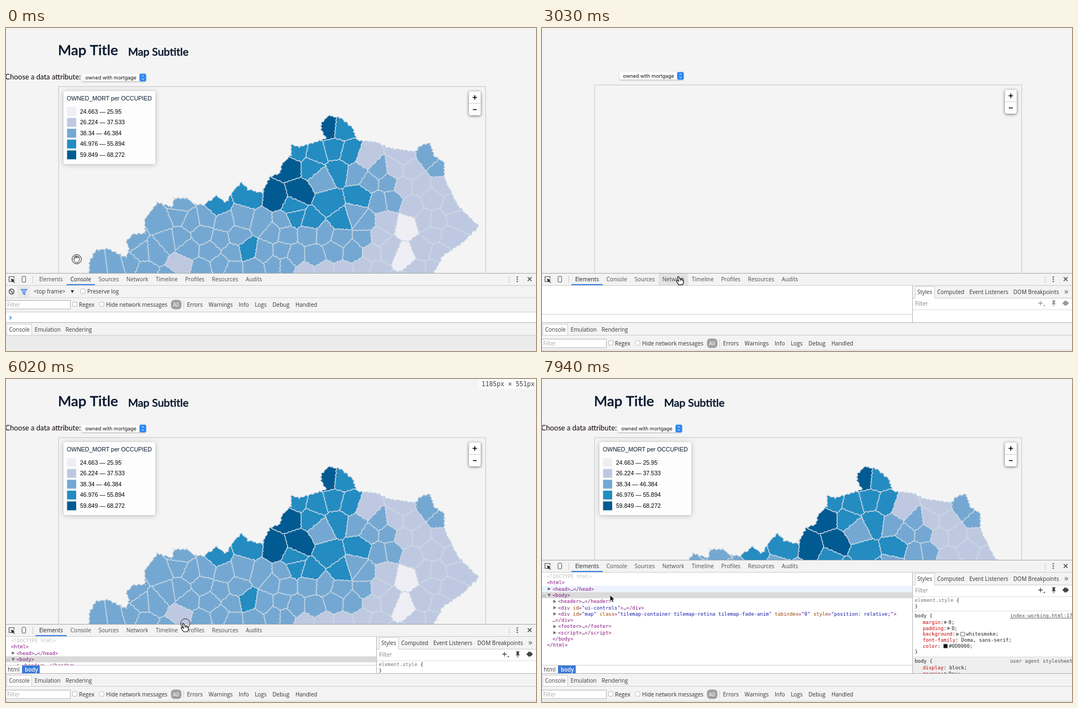
Write an HTML page with a canvas that moves like this. It is 959 px wide and 584 px high and loops after 8000 ms.

```html
<!DOCTYPE html>
<html lang="en">
<head>
<meta charset="utf-8">
<style>
html, body { margin: 0; width: 100%; height: 100%; overflow: hidden; background: #f4f4f4; }
canvas { display: block; }
</style>
</head>
<body>
<canvas id="stage" width="959" height="584"></canvas>
<script>
const ctx = document.getElementById('stage').getContext('2d');
const LOOP = 8000, W = 959, DRAWER = 533;
const UI = '10px "Open Sans", sans-serif';
const MONO = '8.93px "DejaVu Sans Mono", monospace';
const SHADES = ['#f0eef5', '#bec9e1', '#74a8d2', '#248cc1', '#015b92'];

// ---------- drawing helpers ----------
function rect(x, y, w, h, color) {
  ctx.fillStyle = color;
  ctx.fillRect(x, y, w, h);
}
function box(x, y, w, h, fill, stroke, r = 0) {
  ctx.beginPath();
  ctx.roundRect(x, y, w, h, r);
  ctx.fillStyle = fill;
  ctx.fill();
  if (stroke) { ctx.strokeStyle = stroke; ctx.lineWidth = 1; ctx.stroke(); }
}
function shadowBox(x, y, w, h, r, blur, alpha) {
  ctx.save();
  ctx.shadowColor = `rgba(0,0,0,${alpha})`;
  ctx.shadowBlur = blur;
  ctx.shadowOffsetY = 1;
  box(x, y, w, h, '#fdfdfd', null, r);
  ctx.restore();
}
function text(s, x, baseline, font = UI, color = '#333') {
  ctx.font = font;
  ctx.fillStyle = color;
  ctx.fillText(s, x, baseline);
  return x + ctx.measureText(s).width;
}
function heading(s, x, baseline, size) {
  text(s, x, baseline, `500 ${size}px Lato, sans-serif`, '#06152b');
  ctx.strokeStyle = '#06152b';
  ctx.lineWidth = 0.5;
  ctx.strokeText(s, x, baseline);
}
// Lays labels out in a row: [label, left, width] each.
function flow(labels, x, gap) {
  ctx.font = UI;
  return labels.map(label => {
    const item = [label, x, ctx.measureText(label).width];
    x += item[2] + gap;
    return item;
  });
}
const labelRow = (labels, x, baseline, gap, color) =>
  flow(labels, x, gap).forEach(([label, left]) => text(label, left, baseline, UI, color));

function shape(d, x, y, fill, stroke, width = 1) {
  const path = new Path2D(d);
  ctx.save();
  ctx.translate(x, y);
  if (fill) { ctx.fillStyle = fill; ctx.fill(path); }
  if (stroke) { ctx.strokeStyle = stroke; ctx.lineWidth = width; ctx.stroke(path); }
  ctx.restore();
}
function clipped(x, y, w, h, draw) {
  ctx.save();
  ctx.beginPath();
  ctx.rect(x, y, w, h);
  ctx.clip();
  draw();
  ctx.restore();
}
const triangle = (x, y, open, color = '#6e6e6e') =>
  shape(open ? 'M-3,-2.5H3L0,3Z' : 'M-2.5,-3V3L3,0Z', x, y, color);

// ---------- county map ----------
const points = s => s.split(' ').map(p => p.split(',').map(Number));

const coast = points('150,470 151,422 163,402 185,399 217,415 223,400 217,386 229,373 252,371 251,346 274,315 300,324 305,308 330,308 338,318 358,320 381,303 398,316 413,292 427,279 438,292 463,298 477,270 495,262 500,245 516,230 516,211 532,215 580,199 570,185 571,170 585,158 606,163 628,181 635,203 672,207 692,217 740,224 752,211 767,208 774,230 793,243 793,272 817,321 855,359 828,386 790,412 760,470');
// Counties that stand out from their surroundings, by shade.
const landmarks = [
  '725,358 719,412',
  '318,428 652,237',
  '572,272 765,232 787,255',
  '437,401 440,303 382,322 641,304 606,347 526,222 607,182',
  '585,180 514,251 490,308 529,297',
].flatMap((s, shade) => points(s).map(p => ({ p, shade })));

const noise = n => { const s = Math.sin(n * 127.1) * 43758.5; return s - Math.floor(s); };
const distance = (a, b) => Math.hypot(a[0] - b[0], a[1] - b[1]);

// Light in the east and far south, dark in a leaning ellipse around the centre.
function regionShade([x, y]) {
  if (x > (y < 315 ? 700 : 662) || (y > 430 && x > 508)) return 1;
  const u = (x - 565 + (y - 270) * 0.3) / 60, v = (y - 270) / 98;
  return u * u + v * v < 1 ? 3 : 2;
}
// Position-based wobble keeps shared borders identical on both sides.
const wobble = ([x, y], size) =>
  [x + size * Math.sin(y * 0.9 + x * 0.2), y + size * Math.sin(x * 0.8 - y * 0.1)];

function border(poly, size = 1) {
  const path = new Path2D();
  poly.forEach((a, i) => {
    const b = poly[(i + 1) % poly.length];
    const n = Math.max(1, Math.round(distance(a, b) / 3));
    for (let k = 0; k < n; k++) {
      path.lineTo(...wobble([a[0] + (b[0] - a[0]) * k / n, a[1] + (b[1] - a[1]) * k / n], size));
    }
  });
  path.closePath();
  return path;
}
// Keeps the part of poly that lies nearer to p than to q.
function nearer(poly, p, q) {
  const side = v => (v[0] - (p[0] + q[0]) / 2) * (q[0] - p[0]) + (v[1] - (p[1] + q[1]) / 2) * (q[1] - p[1]);
  return poly.flatMap((a, i) => {
    const b = poly[(i + 1) % poly.length], sa = side(a), sb = side(b);
    const kept = sa <= 0 ? [a] : [];
    if (sa * sb < 0) {
      const f = sa / (sa - sb);
      kept.push([a[0] + (b[0] - a[0]) * f, a[1] + (b[1] - a[1]) * f]);
    }
    return kept;
  });
}
const outline = border(coast, 1.5);

function buildCounties() {
  const sites = [...landmarks];
  for (let i = 0; i < 264; i++) {
    const row = Math.floor(i / 24), col = i % 24;
    const p = [
      145 + col * 32 + (row % 2) * 16 + (noise(i + 1) - 0.5) * 18,
      165 + row * 30 + (noise(i + 500) - 0.5) * 16,
    ];
    const free = landmarks.every(l => distance(l.p, p) > 27);
    if (free && ctx.isPointInPath(outline, ...p)) sites.push({ p, shade: regionShade(p) });
  }
  const area = [[130, 140], [880, 140], [880, 470], [130, 470]];
  return sites.map(({ p, shade }) => ({
    shade,
    path: border(sites.reduce((poly, s) => s.p === p ? poly : nearer(poly, p, s.p), area)),
  }));
}
const counties = buildCounties();

function drawMap() {
  ctx.save();
  ctx.clip(outline);
  ctx.strokeStyle = '#cfd9e3';
  ctx.lineWidth = 1.3;
  for (const { shade, path } of counties) {
    ctx.fillStyle = SHADES[shade];
    ctx.fill(path);
    ctx.stroke(path);
  }
  ctx.restore();
  ctx.strokeStyle = '#c3d2e0';
  ctx.lineWidth = 1.2;
  ctx.stroke(outline);
}

// ---------- web page ----------
function drawLegend() {
  const font = '10.55px "Liberation Sans", Arial, sans-serif';
  shadowBox(104, 114, 166, 132, 4, 10, 0.25);
  text('OWNED_MORT per OCCUPIED', 110, 131, font, '#0b1a30');
  ['24.663 — 25.95', '26.224 — 37.533', '38.34 — 46.384', '46.976 — 55.894', '59.849 — 68.272'].forEach((range, i) => {
    rect(110.5, 143 + i * 19.6, 16.5, 16, SHADES[i]);
    text(range, 134, 154.5 + i * 19.6, font, '#000');
  });
}
function drawPage(loading, bottom) {
  rect(0, 0, W, bottom, '#f4f4f4');
  const dy = loading ? -3 : 0, sx = loading ? 140 : 137;
  if (!loading) {
    heading('Map Title', 94, 49, 25.9);
    heading('Map Subtitle', 221, 50, 19.4);
    text('Choose a data attribute:', -1.5, 92.5, '13px Lato, sans-serif', '#0d0000');
  }
  shadowBox(sx, 82.5 + dy, 116.5, 14, 3, 2, 0.3);
  box(sx + 104.5, 82.5 + dy, 12, 14, '#2a85f4', null, 3);
  shape('M-2,-1.5L0,-4 2,-1.5M-2,1.5L0,4 2,1.5', sx + 110.5, 89.5 + dy, null, '#fff');
  text('owned with mortgage', sx + 6.5, 93 + dy, '9px Inter, sans-serif', '#111');

  ctx.strokeStyle = '#d4d5d6';
  ctx.lineWidth = 1.6;
  ctx.strokeRect(95.2, 105.8 + dy, 772.6, 500);
  if (!loading) {
    drawMap();
    drawLegend();
  }
  shadowBox(837.5, 114.5 + dy, 21.5, 43.5, 4, 5, 0.6);
  rect(837.5, 136 + dy, 21.5, 1, '#ccc');
  shape('M-4,0H4M0,-4V4M-3.5,22H3.5', 848.3, 125.5 + dy, null, '#000', 1.6);
}

// ---------- developer panel ----------
const tabs = flow(['Elements', 'Console', 'Sources', 'Network', 'Timeline', 'Profiles', 'Resources', 'Audits'], 60, 13.5);

function drawTabs(top, selected, hoverX) {
  rect(0, top, W, 22, '#f3f3f3');
  rect(0, top, W, 1, '#a6a6a6');
  rect(0, top + 22, W, 1, '#cccccc');
  shape('M4,4.5H-4.5V-4.5H4.5V-1', 10, top + 11, null, '#555', 1.2);
  shape('M-1,-1L6,1.5 3.5,3 6,6 5,7 2,4 .5,6Z', 10, top + 11, '#333');
  box(29, top + 6, 6.5, 10.5, '#f3f3f3', '#555', 1.5);
  rect(48, top + 5, 1, 13, '#ccc');
  for (const [name, x, width] of tabs) {
    const left = x - 6.7, full = width + 13.5, active = name === selected;
    if (hoverX >= left && hoverX < left + full) rect(left, top + 1, full, 21, '#e3e3e3');
    if (active) rect(left, top + 20, full, 2, '#3f82e4');
    text(name, x, top + 15, UI, active ? '#222' : '#4c4c4c');
  }
  rect(910, top + 5, 1, 13, '#ccc');
  for (const dy of [-4, 0, 4]) rect(924, top + 10 + dy, 2.2, 2.2, '#555');
  shape('M-3.5,-3.5L3.5,3.5M3.5,-3.5L-3.5,3.5', 947.5, top + 11, null, '#444', 1.5);
}

function markup(s, x, baseline) {
  for (const token of s.split(/("[^"]*"|[\w-]+(?==)|…)/)) {
    const color = /^<!/.test(token) ? '#c0c0c0' : token[0] === '"' ? '#1a1aa6'
      : /^[\w-]+$/.test(token) ? '#994500' : token === '…' ? '#333' : '#881280';
    x = text(token, x, baseline, MONO, color);
  }
}
// Two spaces indent a row by one level; ▸ and ▾ mark expanders.
function domRows(tagged) {
  const id = n => tagged ? ` data-quillmar-id="${n}"` : '';
  return [
    '<!DOCTYPE html>',
    `<html${id(470)}>`,
    `  ▸<head${id(471)}>…</head>`,
    `  ▾<body${id(481)}>`,
    `    ▸<header${id(482)}>…</header>`,
    '    ▸<div id="ui-controls">…</div>',
    '    ▸<div id="map" class="tilemap-container tilemap-retina tilemap-fade-anim" tabindex="0" style="position: relative;">',
    '  …</div>',
    '    ▸<footer>…</footer>',
    '    ▸<script>…<\/script>',
    '  </body>',
    '</html>',
  ];
}
function drawTree(top, tagged, hoverHead) {
  domRows(tagged).forEach((row, i) => {
    const [, indent, expander, s] = row.match(/^( *)([▸▾]?)(.*)$/);
    const x = 9 + indent.length * 5, mid = top + 30 + i * 11.3;
    if (expander === '▾') {
      rect(0, mid - 5.5, 670, 11, '#dadada');
      text('…', 1, mid + 2, MONO, '#777');
    }
    if (hoverHead && s.startsWith('<head>')) rect(0, mid - 5.5, 670, 11, '#edf3fe');
    if (expander) triangle(x - 6, mid, expander === '▾');
    markup(s, x, mid + 3);
  });
}
function drawRule(top, rows) {
  text('body {', 674.5, top + 3, MONO, '#222');
  rows.forEach(([name, value, fold, swatch], i) => {
    const mid = top + 12 + i * 10.7;
    let x = text(name, 689, mid + 3, MONO, '#c80000');
    x = text(':', x, mid + 3, MONO, '#222');
    if (fold) triangle(x + 4, mid, false);
    x += fold ? 9 : 5;
    if (swatch) {
      box(x + .5, mid - 3.5, 7, 7, swatch, '#777');
      x += 10;
    }
    text(value, x, mid + 3, MONO, '#222');
  });
}
function drawStyles(top, loading) {
  rect(671, top + 23, 288, 22, '#f3f3f3');
  rect(671, top + 45, 288, 1, '#ccc');
  box(675.5, top + 24.5, 35, 21, '#fff', '#ccc');
  rect(676, top + 45, 34, 1, '#fff');
  labelRow(['Styles', 'Computed', 'Event Listeners', 'DOM Breakpoints'], 679, top + 38, 9);
  text('»', 945, top + 38, '15px "Open Sans", sans-serif', '#555');
  text('Filter', 675, top + 59, UI, '#888');
  const ink = loading ? '#999' : '#444';
  shape('M-4,0H4M0,-4V4', 902, top + 54.5, null, ink, 1.3);
  shape('M6,6H9V3Z', 901, top + 54, ink);
  shape('M-3,-5H3V-4L2,-3V0L4,2H.6V6H-.6V2H-4L-2,0V-3L-3,-4Z', 926, top + 54.5, ink);
  shape('M-6,0L-1,-5 4,0 -1,5ZM1,-5L6,0 1,5Z', 947.5, top + 54.5, ink);
  rect(671, top + 66, 288, 1, '#ddd');
  if (loading) return;
  const end = text('element.style', 674.5, top + 76, MONO, '#777');
  text(' {', end, top + 76, MONO, '#222');
  text('}', 674.5, top + 87, MONO, '#222');
  rect(671, top + 92, 288, 1, '#ddd');
  drawRule(top + 101, [
    ['margin', '0;', true], ['padding', '0;', true], ['background', 'whitesmoke;', true, '#f5f5f5'],
    ['font-family', 'Doma, sans-serif;'], ['color', '#0D0000;', false, '#0d0000'],
  ]);
  text('index-working.html:17', 847, top + 104, MONO, '#555');
  rect(847, top + 105, 112, .8, '#555');
  text('}', 674.5, top + 169, MONO, '#222');
  rect(671, top + 175, 288, 220, '#efefef');
  rect(671, top + 175, 288, 1, '#ddd');
  drawRule(top + 183, [['display', 'block;'], ['margin', '8px;', true]]);
  text('user agent stylesheet', 847, top + 186, MONO, '#555');
}
function drawElements(top, { loading, tagged, hoverHead }) {
  rect(0, top + 23, W, DRAWER - top - 23, '#fff');
  if (!loading) clipped(0, top + 23, 670, 517 - top - 23, () => drawTree(top, tagged, hoverHead));
  rect(0, 517, 670, 1, '#ccc');
  if (!loading) {
    rect(29, 518, 32, 15, '#3879d9');
    text('html', 3, 529);
    text('body', 34, 529, '600 10px "Open Sans", sans-serif', '#fff');
  }
  clipped(671, top + 23, 288, DRAWER - top - 23, () => drawStyles(top, loading));
  rect(670, top + 23, 1, DRAWER - top - 23, '#b5b5b5');
}

const checkbox = (x, mid) => box(x + .5, mid - 4.5, 8, 8, '#fff', '#bbb', 1.5);
function drawFilterRow(mid) {
  box(-.5, mid - 7.5, 117, 15.5, '#fff', '#b0b0b0');
  text('Filter', 2, mid + 4, UI, '#aaa');
  checkbox(120, mid);
  text('Regex', 132, mid + 4);
  checkbox(168.5, mid);
  text('Hide network messages', 181, mid + 4);
  box(298.5, mid - 8.5, 19, 17, '#a0a0a0', null, 6);
  text('All', 302, mid + 3.5, UI, '#fff');
  rect(321, mid - 7, 1, 14, '#ccc');
  labelRow(['Errors', 'Warnings', 'Info', 'Logs', 'Debug', 'Handled'], 327.5, mid + 3.5, 10.7);
}
function drawConsole() {
  rect(0, 466, W, 47, '#f3f3f3');
  rect(0, 487, W, 1, '#d5d5d5');
  rect(0, 513, W, 20, '#fff');
  rect(0, 513, W, 1, '#ccc');
  shape('M4.5,0A4.5,4.5 0 1 1 -4.5,0A4.5,4.5 0 1 1 4.5,0M-3,-3L3,3', 10, 476.5, null, '#444', 1.4);
  rect(21, 467, 22, 20, '#e8e8e8');
  shape('M-5,-4.5H5L1.5,0V5L-1.5,3.5V0Z', 32.5, 477, '#9cc0f8', '#2f73e0', 1.2);
  text('<top frame>', 50, 480);
  triangle(120, 476.5, true, '#333');
  checkbox(134.5, 476.5);
  text('Preserve log', 147, 480);
  drawFilterRow(500);
  shape('M-1.5,-3L1.5,0 -1.5,3', 8, 524, null, '#2f73e0', 1.4);
}
function drawDrawer(withFilter) {
  rect(0, DRAWER, W, 51, withFilter ? '#f3f3f3' : '#ebebeb');
  rect(0, DRAWER, W, 22, '#f3f3f3');
  rect(0, DRAWER - 1, W, 1, '#b0b0b0');
  rect(0, 555, W, 1, '#ccc');
  box(1.5, 535.5, 45, 20, '#fff', '#ccc');
  labelRow(['Console', 'Emulation', 'Rendering'], 5.5, 549, 8.7, '#3a3a3a');
  if (withFilter) {
    drawFilterRow(570);
    rect(0, 582, W, 1, '#ccc');
    rect(0, 583, W, 1, '#fff');
  }
}

// ---------- pointer ----------
const ARROW = 'M0,0V11.5L2.7,9 4.6,13 6.6,12.2 4.8,8.2H8.3Z';
const HAND = 'M-1.8,1Q-1.2,-.8 .4,.3L3,5 5,4.3 7,5 8.6,6.4 9.2,11 7.2,15H.5L-2.5,11 -4,7.6 -2.4,6.6 .2,8.6Z';
const PALM = 'M-6,0L-4.5,-1 -3.5,0 -5,-4 -3.5,-5 -2,-2 -2.2,-6H-.5L0,-2 1,-6 2.6,-5.5 2.4,-2 4,-4.5 5.2,-3.5 4.5,2 3,6H-2.5Z';

function ring(x, y) {
  ctx.beginPath();
  ctx.arc(x, y, 8.5, 0, 7);
  ctx.strokeStyle = '#222';
  ctx.lineWidth = 1;
  ctx.stroke();
}
function drawPointer(x, y, kind, pressed) {
  if (kind === 'palm') ring(x, y);
  if (pressed) ring(x + 3.5, y);
  if (kind === 'palm') {
    shape(PALM, x, y, '#fff', '#111', .8);
  } else if (kind === 'hand') {
    shape(HAND, x, y, '#fff', '#111', 1.2);
    shape('M3,5V8M5,4.5V8M7,5V8.5', x, y, null, '#111', .8);
  } else {
    shape(ARROW, x, y, '#000', '#fff', .8);
  }
}

// ---------- timeline ----------
const DRAG = 5880, RELEASE = 7340;
// Stops of the pointer: time, x, y.
const stops = [
  [0, 128, 418], [600, 86, 453], [930, 90, 455], [1680, 258, 453], [3330, 246, 449], [3780, 273, 438],
  [4530, 277, 449], [5280, 317, 446], [DRAG, 321, 443], [RELEASE, 322, 326], [7930, 119, 392],
];
// The picture is refreshed about every 150 ms.
function refreshed(t) {
  const offset = t < 6300 ? 30 : 80;
  return Math.max(0, Math.floor((t - offset) / 150) * 150 + offset);
}
// Height of the divider while dragged up; a larger power arrives sooner.
function dragged(t, power) {
  const f = Math.min(1, Math.max(0, (t - DRAG) / 1010));
  return Math.round(327 + 116 * (1 - f) ** power);
}
function pointerAt(t) {
  const next = stops.findIndex(s => s[0] > t);
  if (next < 0) return stops[stops.length - 1].slice(1);
  const [t0, x0, y0] = stops[next - 1], [t1, x1, y1] = stops[next];
  const f = (t - t0) / (t1 - t0), eased = f * f * (3 - 2 * f);
  const y = t >= DRAG && t < RELEASE ? dragged(t, 3.3) - 1 : y0 + (y1 - y0) * eased;
  return [x0 + (x1 - x0) * eased, y];
}

function draw(t) {
  const step = refreshed(t);
  const loading = t >= 2740 && t < 3180;
  const onConsole = t < 780;
  const pressed = t >= DRAG && t < 7040;
  // The page, the panel and the pointer follow the drag at different speeds.
  const top = dragged(step, 1.6), bottom = dragged(step, 2.3);
  const [x, y] = pointerAt(step);
  const overTabs = !pressed && y >= top && y < top + 22;

  rect(0, 0, W, 584, '#fff');
  clipped(0, 0, W, bottom, () => drawPage(loading, bottom));
  if (t >= DRAG && t < 7490) {
    rect(856, 0, 103, 18, 'rgba(255,255,255,.85)');
    text(`1185px × ${Math.round(top * 1.2357 + 4)}px`, 860.5, 12.5, '11.4px "DejaVu Sans Mono", monospace', '#444');
  }
  if (onConsole) drawConsole();
  else drawElements(top, { loading, tagged: t < 2740, hoverHead: t >= 7790 });
  drawTabs(top, onConsole ? 'Console' : 'Elements', overTabs ? x + 2 : -1);
  drawDrawer(!onConsole);
  drawPointer(x, y, t < 450 ? 'palm' : pressed || overTabs ? 'hand' : 'arrow', pressed);
}
function tick() {
  draw(performance.now() % LOOP);
  requestAnimationFrame(tick);
}
tick();
</script>
</body>
</html>
```
